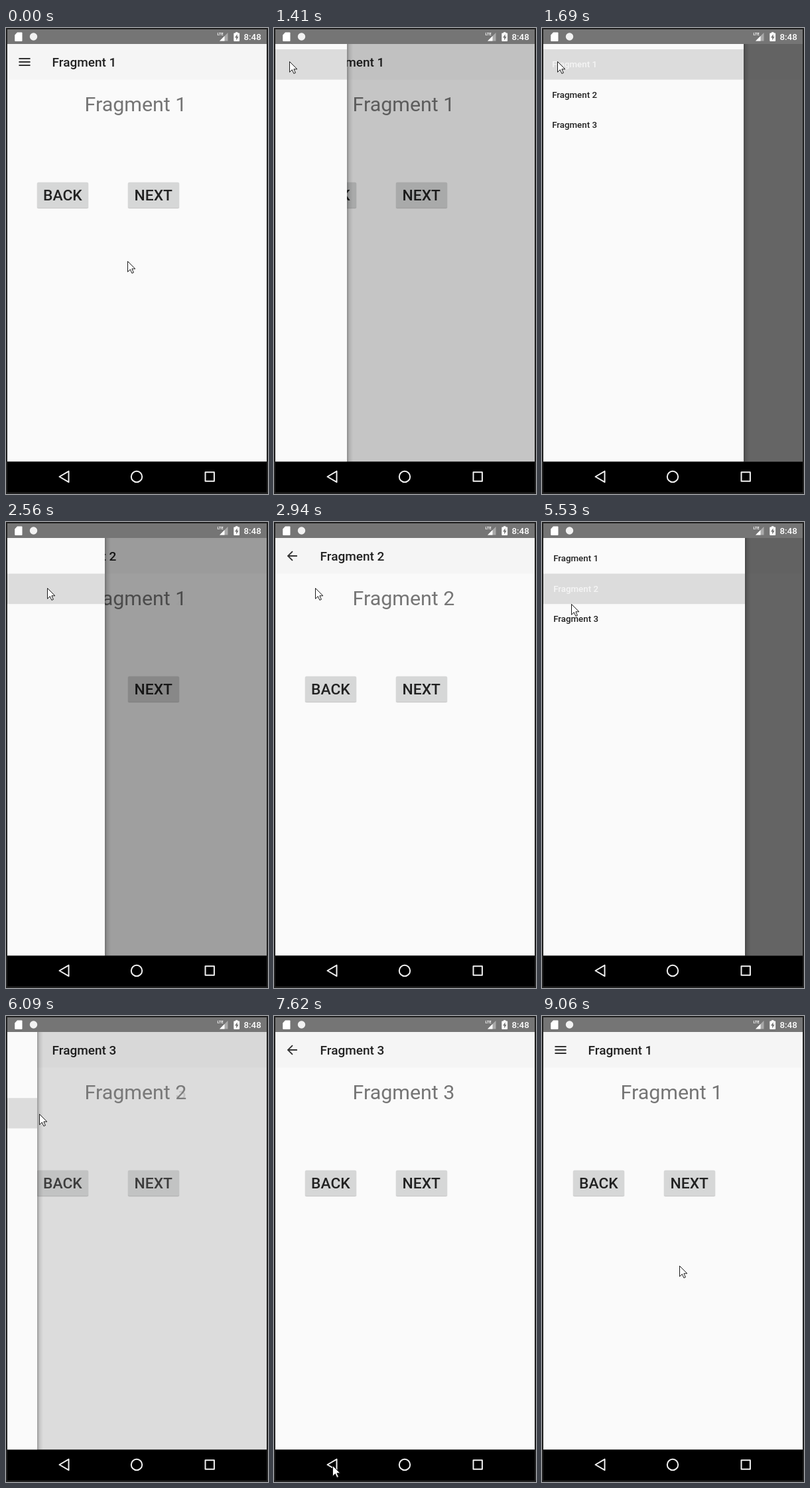
Recreate the animation shown at these times as an HTML page. Size 395x700 px, loop 9.75 s.

```html
<!DOCTYPE html>
<html lang="en">
<head>
<meta charset="utf-8">
<title>Navigation drawer</title>
<style>
html, body { margin: 0; width: 100%; height: 100%; overflow: hidden; background: #212121; }
svg { display: block; width: 395px; height: 700px; font-family: Roboto, "Noto Sans", sans-serif; }
.m { font-weight: 500; }
</style>
</head>
<body>
<svg viewBox="0 0 395 700">
  <defs>
    <linearGradient id="shade">
      <stop offset="0" stop-color="#000" stop-opacity=".3"/>
      <stop offset=".4" stop-color="#000" stop-opacity=".1"/>
      <stop offset="1" stop-color="#000" stop-opacity="0"/>
    </linearGradient>
    <clipPath id="screen"><rect x="2" y="24" width="391" height="627.5"/></clipPath>
    <clipPath id="navClip"><rect x="2" y="651" width="391" height="46.5"/></clipPath>
    <g id="buttons">
      <g fill="#000">
        <rect x="46.4" y="232" width="78.2" height="39.6" rx="2.5" opacity=".07"/>
        <rect x="183.4" y="232" width="78.2" height="39.6" rx="2.5" opacity=".07"/>
        <rect x="47" y="233" width="77" height="38" rx="2" opacity=".13"/>
        <rect x="184" y="233" width="77" height="38" rx="2" opacity=".13"/>
      </g>
      <g fill="#d6d7d7">
        <rect x="47" y="231.7" width="77" height="38.3" rx="2"/>
        <rect x="184" y="231.7" width="77" height="38.3" rx="2"/>
      </g>
      <g class="m" font-size="22.8" fill="#212121" text-anchor="middle">
        <text x="85.4" y="259.3">BACK</text>
        <text x="222.3" y="259.3">NEXT</text>
      </g>
    </g>
  </defs>

  <rect width="395" height="700" fill="#212121"/>
  <rect x="2" y="2" width="391" height="22.5" fill="#757575"/>

  <!-- status bar -->
  <g fill="#fff">
    <path d="M17 6.5H23.5a1 1 0 0 1 1 1V19a1 1 0 0 1-1 1H14.2a1 1 0 0 1-1-1V10.5z"/>
    <circle cx="41.5" cy="13" r="5.7" fill="#f2f2f2"/>
    <text x="318.6" y="11.3" font-size="5.6" font-weight="700">LTE</text>
    <path d="M322 19.5H334.5V7z" opacity=".38"/>
    <path d="M322 19.5H329.5V12z"/>
    <path d="M346 6.2H349.4V7.6H351.2a.9.9 0 0 1 .9.9V19.1a.9.9 0 0 1-.9.9H344.2a.9.9 0 0 1-.9-.9V8.5a.9.9 0 0 1 .9-.9H346z"/>
    <path d="M348.6 9.3L345 14.6H347.2V18.4L350.6 13H348.6z" fill="#757575"/>
    <text class="m" x="358.5" y="18" font-size="13.3">8:48</text>
  </g>

  <g clip-path="url(#screen)">
    <rect x="2" y="24" width="391" height="628" fill="#fafafa"/>
    <rect x="2" y="24" width="391" height="53.5" fill="#f5f5f5"/>
    <text id="title" class="m" x="69.6" y="58.3" font-size="19" fill="#212121"></text>
    <circle id="tap" cx="24.5" cy="51.5" fill="#000"/>
    <path id="icon" fill="none" stroke="#333" stroke-width="1.9"/>
    <g id="leave"><text x="118.6" y="125.2" font-size="30.4" fill="#757575"></text><use href="#buttons"/></g>
    <g id="enter"><text x="118.6" y="125.2" font-size="30.4" fill="#757575"></text><use href="#buttons"/></g>
    <rect id="scrim" x="2" y="24" width="391" height="628" fill="#000"/>
    <g id="drawer">
      <rect x="304" y="24" width="9" height="628" fill="url(#shade)"/>
      <rect y="24" width="304" height="628" fill="#fafafa"/>
      <rect id="mark" width="304" height="45.6" fill="#dcdcdc"/>
      <g id="items" class="m" font-size="13.3"></g>
    </g>
  </g>

  <!-- system keys -->
  <rect x="2" y="651.5" width="391" height="46" fill="#000"/>
  <g clip-path="url(#navClip)"><rect id="glow" y="651.5" height="46" rx="23" fill="#fff"/></g>
  <g fill="none" stroke="#f0f0f0" stroke-width="2">
    <path d="M80.5 674L94.5 665.8V682.2z" stroke-linejoin="round"/>
    <circle cx="197" cy="674" r="8.2"/>
    <rect x="300.5" y="667.3" width="13.4" height="13.4" stroke-linejoin="round"/>
  </g>

  <path id="cursor" d="M.5 .5V16.3L4.3 12.7L6.9 18.4L9.4 17.3L6.9 11.8H11.9z" fill="#fff" stroke="#1a1a1a" stroke-width="1"/>
</svg>
<script>
const LOOP = 9750, WIDTH = 304, SETTLE = 512;
const $ = id => document.getElementById(id);
const clamp = v => Math.max(0, Math.min(1, v));
const mix = (a, b, p) => a + (b - a) * p;
const span = (t, start, len) => clamp((t - start) / len);
const smooth = p => (1 - Math.cos(Math.PI * p)) / 2;
const set = (el, attrs) => { for (const k in attrs) el.setAttribute(k, attrs[k]); };

// time, x, y
const path = [
  [490, 183, 350], [1220, 23, 50],
  [1700, 23, 50], [2000, 61, 96],
  [2150, 61, 96], [2200, 62, 99],
  [3480, 62, 99], [4090, 24, 51],
  [5170, 24, 51], [5710, 50, 147],
  [6830, 50, 147], [7270, 100, 645], [7470, 88, 675],
  [8550, 88, 675], [9060, 207, 375]
];

// page changes: when the bar changes, when the fade starts, pages
const moves = [
  { bar: 2485, fade: 2532, from: 1, to: 2 },
  { bar: 5915, fade: 5970, from: 2, to: 3 },
  { bar: 7810, fade: 7850, from: 3, to: 1 }
];
const opens = [1368, 4429], closes = [2492, 5929];
const taps = [1220, 4280];

const items = [1, 2, 3].map(n => {
  const el = document.createElementNS("http://www.w3.org/2000/svg", "text");
  el.textContent = "Fragment " + n;
  set(el, { x: 15.2, y: 59.2 + 45.6 * (n - 1) });
  $("items").append(el);
  return el;
});

function drawerAt(t, lag) {
  for (let i = 0; i < 2; i++) {
    if (t < opens[i]) return 0;
    const start = closes[i] + lag;
    if (t < start) return 1 - (1 - span(t, opens[i], SETTLE)) ** 5;
    if (t < start + SETTLE) return (1 - span(t, start, SETTLE)) ** 5;
  }
  return 0;
}

function cursorAt(t) {
  if (t <= path[0][0]) return path[0].slice(1);
  for (let i = 1; i < path.length; i++) {
    const [t1, x1, y1] = path[i], [t0, x0, y0] = path[i - 1];
    if (t < t1) {
      const p = smooth(span(t, t0, t1 - t0));
      return [mix(x0, x1, p), mix(y0, y1, p)];
    }
  }
  return path[path.length - 1].slice(1);
}

// p = 0 menu bars, p = 1 back arrow
function drawIcon(p, turn) {
  const u = 0.95, cut = mix(0, 0.7 * u, p), a = mix(0, Math.PI / 4, p);
  const head = mix(18, 11.3, p) * u, shaft = mix(18, 16, p) * u;
  const off = mix(5.2, -0.7, p) * u, edge = -shaft / 2;
  const dx = head * Math.cos(a), dy = head * Math.sin(a);
  set($("icon"), {
    d: `M${edge + cut} 0h${shaft - 2 * cut}M${edge} ${off}l${dx} ${dy}M${edge} ${-off}l${dx} ${-dy}`,
    transform: `translate(28 51) rotate(${turn * mix(180, 0, p)})`
  });
}

function showPage(el, n, alpha) {
  el.firstChild.textContent = "Fragment " + n;
  set(el, { opacity: alpha });
}

function render(t) {
  let page = 1, move = null;
  for (const m of moves) if (t >= m.bar) { page = m.to; move = m; }
  $("title").textContent = "Fragment " + page;

  const fade = move ? smooth(span(t, move.fade, 400)) : 1;
  showPage($("leave"), move ? move.from : 1, 1 - fade);
  showPage($("enter"), page, fade);

  const back = t >= moves[2].bar;
  const arrow = back ? 1 - smooth(span(t, moves[2].bar, 300)) : smooth(span(t, moves[0].bar, 300));
  drawIcon(arrow, back ? 1 : -1);

  const tap = taps.find(s => t >= s && t < s + 400);
  set($("tap"), tap ? { r: 12, opacity: 0.07 * (1 - span(t, tap + 150, 250)) } : { r: 0, opacity: 0 });

  const open = drawerAt(t, 0);
  set($("drawer"), {
    transform: `translate(${2 - WIDTH + Math.round(WIDTH * open)} 0)`,
    visibility: open > 0.001 ? "visible" : "hidden"
  });
  set($("scrim"), { opacity: 0.6 * drawerAt(t, 20) });

  const row = t < 2450 ? 1 : t < 5880 ? 2 : t < 7810 ? 3 : 1;
  set($("mark"), { y: 32 + 45.6 * (row - 1) });
  items.forEach((el, i) => set(el, { fill: i + 1 === row ? "#f5f5f5" : "#212121" }));

  // key press glow
  const grow = 1 - (1 - span(t, 7810, 350)) ** 3;
  const w = 76 * mix(1, 1.35, grow);
  set($("glow"), {
    x: 87.5 - w / 2, width: w,
    opacity: t < 7810 ? 0 : 0.2 * span(t, 7800, 60) * (1 - span(t, 7900, 450))
  });

  const [x, y] = cursorAt(t);
  set($("cursor"), { transform: `translate(${Math.round(x)} ${Math.round(y)})` });
}

const begin = performance.now();
function tick() {
  render((performance.now() - begin) % LOOP);
  requestAnimationFrame(tick);
}
tick();
</script>
</body>
</html>
```
